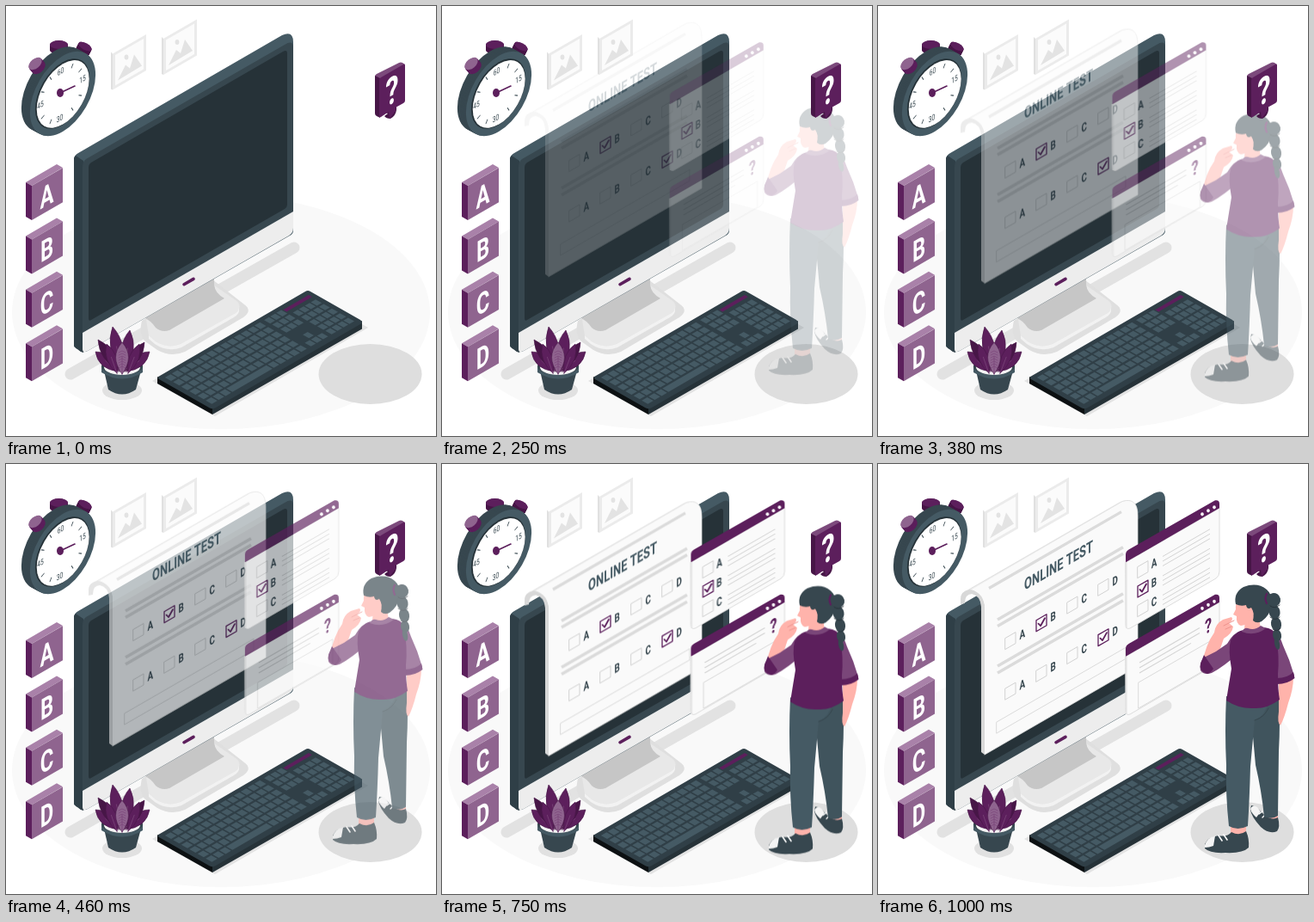
Animation of 500x500 px, one loop 1.04 s. Source, as an HTML page with a canvas:

```html
<!DOCTYPE html>
<html lang="en">
<head>
<meta charset="utf-8">
<title>Online test</title>
<style>
html, body { margin: 0; width: 100%; height: 100%; overflow: hidden; background: #fff; }
canvas { display: block; width: 500px; height: 500px; }
</style>
</head>
<body>
<canvas id="stage"></canvas>
<script>
const SIZE = 500, LOOP = 1040, STEPS = 25, SLIDE = 30;
const SLOPE = Math.tan(Math.PI / 6);
const C = {
  plum: '#5c1f5c', plumDark: '#471647', plumMid: '#7a4679', plumSoft: '#8f648f', plumPale: '#a981a9',
  ink: '#263238', slate: '#37474f', steel: '#455a64',
  skin: '#ffb3ab', line: '#dbdbdb', paper: '#fafafa'
};
const scale = Math.max(1, window.devicePixelRatio || 1);
let g;

function prepare(canvas) {
  canvas.width = canvas.height = SIZE * scale;
  const c = canvas.getContext('2d');
  c.scale(scale, scale);
  c.lineCap = c.lineJoin = 'round';
  return c;
}

function layer(draw) {
  const canvas = document.createElement('canvas');
  g = prepare(canvas);
  draw();
  return canvas;
}

function shape(d, fill, stroke, width = 1) {
  const p = new Path2D(d);
  if (fill) { g.fillStyle = fill; g.fill(p); }
  if (stroke) { g.strokeStyle = stroke; g.lineWidth = width; g.stroke(p); }
}

function poly(points, fill) {
  g.beginPath();
  points.forEach(([x, y]) => g.lineTo(x, y));
  g.closePath();
  g.fillStyle = fill;
  g.fill();
}

function oval(x, y, rx, ry, fill, turn = 0) {
  g.beginPath();
  g.ellipse(x, y, rx, ry, turn, 0, 7);
  g.fillStyle = fill;
  g.fill();
}

// Runs draw on a vertical plane that rises to the right.
function onWall(x, y, draw) {
  g.save();
  g.transform(0.866, -0.5, 0, 1, x, y);
  draw();
  g.restore();
}

// A straight bar that follows the wall.
function rule(x, y, x2, width, color = C.line) {
  g.beginPath();
  g.moveTo(x, y);
  g.lineTo(x2, y - (x2 - x) * SLOPE);
  g.strokeStyle = color;
  g.lineWidth = width;
  g.lineCap = 'butt';
  g.stroke();
  g.lineCap = 'round';
}

function panel(x, y, w, h) {
  const rise = w * SLOPE;
  return `M${x} ${y}L${x + w} ${y - rise}V${y - rise + h}L${x} ${y + h}Z`;
}

// Narrow lettering on the wall, centred on x, y.
function label(s, x, y, size, color, weight = 700) {
  g.save();
  g.transform(0.7, -0.7 * SLOPE, 0, 1, x, y);
  g.font = `${weight} ${size}px Roboto, "Liberation Sans", sans-serif`;
  g.textAlign = 'center';
  g.fillStyle = color;
  g.fillText(s, 0, size * 0.355);
  g.restore();
}

function checkbox(x, y, on) {
  shape(panel(x - 6, y - 3, 12, 13), null, on ? C.plum : '#d2d2d2', on ? 1.3 : 1);
  if (on) shape(`M${x - 3.5} ${y + 1}L${x - 1} ${y + 3.5}L${x + 4} ${y - 5.5}`, null, C.plum, 1.8);
}

function picture(x, y) {
  shape(`M${x - 2} ${y - 2}L${x} ${y}V${y + 42}L${x - 2} ${y + 41}Z`, '#e0e0e0');
  shape(panel(x, y, 39, 42), '#ebebeb');
  shape(panel(x + 3, y + 1.5, 33, 35.5), '#fbfbfb');
  shape(`M${x + 6} ${y + 31}L${x + 15} ${y + 13}L${x + 20} ${y + 17}L${x + 25} ${y + 1}L${x + 34} ${y + 14}Z`, '#e3e3e3');
  oval(x + 16, y + 4, 2.4, 3, '#e3e3e3');
}

function tile(letter, y) {
  poly([[23, y + 21], [59, y], [66, y + 4], [30, y + 25]], C.plumPale);
  poly([[23, y + 21], [30, y + 25], [30, y + 65], [23, y + 61]], C.plum);
  shape(panel(30, y + 25, 36, 40), C.plumSoft);
  label(letter, 47.5, y + 36, 34, '#fff', 700);
}

// A short cylinder whose cap lies dx, dy away from its base.
function knob(x, y, dx, dy, rx, ry, turn, side, cap) {
  const n = 12;
  for (let i = 0; i <= n; i++)
    oval(x + dx * i / n, y + dy * i / n, rx, ry, i < n ? side : cap, turn);
}

function stopwatch() {
  const disc = (x, y, r, fill) => onWall(x, y, () => oval(0, 0, r, r, fill));
  knob(89, 53, 3, -6, 8.5, 4, 0.5, C.plumDark, C.plum);
  shape('M57 52h9v9h-9Z', C.slate);
  knob(61.5, 51, 0, -6, 10.5, 5, 0, C.plumDark, C.plum);
  for (let i = 0; i <= 10; i++) disc(56 + i, 96.5 + i * 0.55, 44, i < 10 ? C.slate : C.steel);
  knob(38, 72, -4, -5, 9, 5.5, -0.7, C.plum, C.plumSoft);
  disc(65.5, 102, 36.5, C.ink);
  disc(66.2, 102.4, 35.2, '#fff');
  onWall(64.5, 102, () => {
    for (let i = 0; i < 12; i++) {
      if (i % 3 === 0) continue;
      const a = i * Math.PI / 6, c = Math.cos(a), s = Math.sin(a);
      g.beginPath();
      g.moveTo(c * 27, s * 27);
      g.lineTo(c * 31, s * 31);
      g.strokeStyle = C.slate;
      g.lineWidth = 1;
      g.stroke();
    }
  });
  label('60', 63.5, 76, 9.5, C.slate, 400);
  label('15', 89, 85, 9.5, C.slate, 400);
  label('30', 62.5, 130.5, 9.5, C.slate, 400);
  label('45', 40, 115, 9.5, C.slate, 400);
  shape('M63 101L80 93', null, C.plum, 1.6);
  oval(63, 101, 4, 5, C.plum);
}

function monitor() {
  shape('M75 428L335 281', null, '#e2e2e2', 13);
  // stand
  shape('M158 366L240 318L277 347Q287 354 276 362L208 402Q192 409 176 400L162 390Q154 382 158 366Z', '#dfdfdf');
  shape('M163 365L238 322L267 342Q276 349 267 357L203 393Q188 399 174 390L166 383Z', '#e8e8e8');
  shape('M166 383L174 390Q188 399 203 393L267 357Q271 354 271 349V355Q270 359 265 362L204 397Q188 403 173 393L166 387Z', '#f2f2f2');
  shape('M160 362L242 314V324Q243 334 254 340L190 377Q181 380 174 374Q169 366 160 362Z', '#c6c6c6');
  // case
  shape('M79 178Q79 174 84 171L321 34Q334 28 334 42V261Q334 265 330 267L95 401Q89 404 85 400L79 396Z', C.steel);
  shape('M79 177Q80 175 81 174L90 180V403Q86 402 83 399Q79 397 79 393Z', '#2f3f47');
  shape('M89 187Q89 181 93 178L324 45Q334 39 334 48V239L89 380Z', C.slate);
  shape('M96 188Q96 184 99 182L322 53Q327 50 327 55V231Q327 234 324 236L99 365Q96 367 96 363Z', C.ink);
  shape('M89 380L334 239V258Q334 264 329 267L95 401Q89 404 89 399Z', '#ededed');
  shape('M207 323.7L218 317.4', null, C.plum, 3.6);
}

function keyboard() {
  const at = (u, v) => [176 + 174 * u + 64 * v, 432 - 101 * u + 36 * v];
  const key = (u, v, w, h, fill = '#455a64') =>
    poly([at(u, v), at(u + w, v), at(u + w, v + h), at(u, v + h)], fill);
  shape('M170 436L351 333L421 374L243 477Z', '#e3e3e3');
  poly([[176, 431], [240, 467], [240, 475], [176, 439]], '#0d1113');
  poly([[240, 467], [414, 366], [414, 375.5], [240, 475]], C.ink);
  shape('M178 430.5L348 332Q351 330 354 332L412 365Q416 368 412 370L243 467.5Q240 469 237 467.5L178 434Q175 432 178 430.5Z', '#303f47');
  for (let r = 0; r < 6; r++) {
    const v = 0.07 + r * 0.148, h = 0.112;
    for (let i = 0; i < 14; i++) {
      if (r === 5 && i > 2 && i < 9) continue;
      key(0.025 + i * 0.046, v, 0.037, h);
    }
    if (r === 5) key(0.163, v, 0.267, h);
    for (let i = 0; i < 3; i++)
      if (r < 3 || r === 5 || (r === 4 && i === 1)) key(0.687 + i * 0.041, v, 0.033, h);
    if (r) for (let i = 0; i < 4; i++) key(0.825 + i * 0.04, v, 0.032, h);
  }
  key(0.81, 0.085, 0.17, 0.06, C.plum);
}

function leaf(x, y, tx, ty, w, fill) {
  const mx = x + (tx - x) * 0.55, my = y + (ty - y) * 0.55;
  const len = Math.hypot(tx - x, ty - y), nx = (y - ty) / len * w, ny = (tx - x) / len * w;
  shape(`M${x} ${y}Q${mx + nx} ${my + ny} ${tx} ${ty}Q${mx - nx} ${my - ny} ${x} ${y}Z`, fill, C.plumDark, 0.6);
  shape(`M${x} ${y}L${mx} ${my}`, null, C.plumMid, 0.8);
}

function plant() {
  oval(135, 447, 23, 11, '#e1e1e1');
  shape('M114 424L119 446Q135 457 151 446L157 424Z', C.slate);
  shape('M111 418V426Q135 441 159 426V418Z', C.steel);
  oval(135, 419, 24, 10, C.slate);
  oval(135, 420, 21, 9, '#f5f5f5');
  leaf(130, 425, 104, 402, 13, C.plum);
  leaf(140, 425, 167, 402, 13, C.plum);
  leaf(132, 425, 107, 388, 12, C.plumDark);
  leaf(138, 425, 161, 391, 12, C.plumDark);
  leaf(134, 424, 124, 373, 14, C.plum);
  leaf(138, 424, 144, 377, 14, C.plum);
  leaf(129, 427, 117, 393, 11, C.plum);
  leaf(142, 427, 155, 393, 11, C.plum);
  leaf(135, 428, 135, 391, 15, C.plumSoft);
  for (let y = 401; y < 421; y += 3) shape(`M131 ${y + 2}L135 ${y}L139 ${y + 2}`, null, C.plumMid, 0.7);
}

function scene() {
  g.fillStyle = '#fff';
  g.fillRect(0, 0, SIZE, SIZE);
  oval(250, 356, 243, 136, '#f9f9f9');
  picture(124, 55.5);
  picture(183, 38);
  stopwatch();
  [...'ABCD'].forEach((s, i) => tile(s, 184 + i * 62.4));
  monitor();
  keyboard();
  plant();
  oval(423.5, 428, 60, 35, '#dedede');
}

function paper() {
  // rolled-over top edge and its open end
  shape('M96 163V157Q96 150 103 147L281 44Q302 36 302 62L124 166Q122 154 112 151Q101 150 101 161Z', '#efefef');
  shape('M96 163V157Q96 148 106 146Q122 147 124 165V338L120 335V166Q119 153 109 151Q101 151 101 162Z', '#d8d8d8');
  shape('M124 338V166Q123 151 109 146L284 44Q302 38 302 60V235Z', C.paper);
  shape('M106 146L284 43.5Q302 38 302 60V235L124 338', null, '#dedede', 0.8);

  rule(129, 144.5, 283, 3.2);
  label('ONLINE TEST', 210, 117.5, 18.5, C.steel);
  for (const y of [181, 188.5, 235, 243]) rule(139, y, 285, 3.4);
  for (let row = 0; row < 2; row++)
    for (let i = 0; i < 4; i++) {
      const x = 154 + i * 36, y = 205.5 + row * 58.5 - i * 36 * SLOPE;
      checkbox(x, y, i === (row ? 3 : 1));
      label('ABCD'[i], x + 13.7, y - 7.8, 14, C.slate);
    }
  shape(panel(138, 300, 150, 13), null, C.line, 1);
}

function frame(y, bottom) {
  const b = bottom;
  shape(`M288 ${y + 12}L397 ${y - 51}V${b - 67}Q397 ${b - 62} 393 ${b - 59}L293 ${b - 1}Q288 ${b + 1} 288 ${b - 5}Z`,
    C.paper, '#dadada', 0.9);
  shape(`M288.7 ${y + 12}V${b - 2}`, null, '#e4e4e4', 1.8);
  shape(`M288 ${y + 12}V${y + 3}Q288 ${y - 1} 292 ${y - 3}L392 ${y - 60}Q397 ${y - 61} 397 ${y - 56}V${y - 51}Z`, C.plum);
  for (let i = 0; i < 3; i++) oval(377 + i * 7, y - 44 - i * 4, 1.8, 2.1, '#fff');
}

function windows() {
  frame(102.3, 192);
  for (let i = 0; i < 3; i++) {
    const y = 123.5 + i * 22.5;
    checkbox(308, y - 1, i === 1);
    label('ABC'[i], 321, y - 8.5, 14, C.slate);
    for (let k = 0; k < 3; k++) rule(331, y - 16 + k * 5.5, 386, 1, '#d4d4d4');
  }
  frame(211.8, 292);
  for (let k = 0; k < 3; k++) rule(304, 231 + k * 6, k < 2 ? 374 : 364, 1.1, '#d4d4d4');
  shape(panel(303, 254, 87, 30), null, C.line, 1);
  label('?', 384, 188, 23, C.plum);
}

function woman() {
  // far shoe, near shoe
  shape('M450 405L465 404V418H450Z', C.skin);
  shape('M434 397Q440 397 449 408Q458 415 465 411Q468 422 464 427Q455 431 445 422Q434 410 433 402Z', C.slate);
  shape('M433 401Q436 395 441 399L445 404L440 411Q434 406 433 401Z', '#f4f4f4');
  shape('M443 407L447 404M447 411L451 407', null, '#fff', 1.3);
  shape('M410 414H428V434H410Z', C.skin);
  shape('M380 442Q383 434 396 432Q406 434 411 428Q420 433 428 427Q432 436 431 446Q424 453 404 452Q386 453 380 447Z', C.slate);
  shape('M380 443Q383 434 392 432.5L390 444Q385 446 380 446Z', '#f4f4f4');
  shape('M396 432L400 438M402 431L406 437', null, '#fff', 1.6);
  // trousers
  shape('M434 274L466 270Q468 300 466 334L465 409Q458 414 449 410Q446 380 439 350L435 306Z', '#40545d');
  shape('M405 270L454 276Q451 292 438 298Q435 330 433 352Q432 390 430 421Q418 427 408 421Q404 385 405 350Q403 310 405 270Z', C.steel);
  shape('M438 298Q449 295 454 284', null, C.slate, 1);
  // right arm
  shape('M466 250L483 248Q483 262 477 278Q473 294 468 304Q464 302 466 288Z', C.skin);
  shape('M456 193Q467 197 471 211Q479 228 484 246Q477 254 464 254Q464 236 457 222Z', C.plumMid);
  shape('M464 249Q476 249 483 242L484.5 249Q476 256 464 256Z', C.plum);
  // left forearm and hand
  shape('M377 232Q381 210 391 196Q392 186 401 181L411 178Q414 181 408 185L413 189Q412 197 402 203Q397 218 390 236Z', C.skin);
  shape('M414 182L402 188M411 189L404 192', null, '#ee938e', 1);
  shape('M424 193Q413 196 406 209L393 218L379 225Q373 232 375 240Q379 246 388 243Q403 235 419 220Z', C.plumMid);
  shape('M379 222L390 238Q387 243 383 244Q373 241 375 232Z', C.plum);
  // neck, vest
  shape('M427 178L443 176L445 193Q435 199 426 192Z', C.skin);
  shape('M422 194Q437 199 449 190Q460 191 463 199Q467 224 465 244Q465 263 467 274Q452 285 437 284Q420 285 405 275Q408 256 411 238Q407 216 410 205Q414 197 422 194Z', C.plum);
  shape('M423 195Q426 190 430 191Q438 194 445 188L451 191Q438 201 423 195Z', C.plumMid);
  // face and hair
  shape('M419 156Q415 164 416 169L413 175L417 177Q416 186 422 188Q430 187 433 181L444 179L442 160L430 153Z', C.skin);
  shape('M416 163Q413 150 425 143Q441 137 452 146Q459 152 458 163Q456 176 446 183Q440 186 436 182Q438 173 434 167Q429 170 428 164Q422 166 416 163Z', C.slate);
  oval(433.5, 174, 2.8, 4.2, C.skin);
  [[460, 158, 8, 8], [461, 172, 6.5, 8], [463, 186, 6, 8], [464, 199, 5, 7], [464, 209, 3, 7]]
    .forEach(([x, y, rx, ry]) => oval(x, y, rx, ry, C.slate, -0.2));
  shape('M456 165Q461 169 467 164M456 178Q462 183 467 178M459 192Q464 196 468 191', null, C.ink, 0.9);
  shape('M452 151Q449 156 452 162', null, C.plum, 2.2);
}

function bubble() {
  shape('M441 124L454 116V121Q453 128 447 131Q442 131 440 128L444 125Z', C.plumDark);
  shape('M429 82Q429 80 431 79L457 66Q459 65 461 66L464 68L434 85Z', '#7c4a7c');
  shape('M429 81L435 84V130L431 128Q429 127 429 125Z', C.plumDark);
  shape('M434 86Q434 84 436 83L462 68Q464 67 464 69V110Q464 112 462 113L453 118V122L446 131L445 123L436 129Q434 130 434 128Z', C.plum);
  label('?', 449, 98, 44, '#fff');
}

// Cubic Bézier easing with a soft overshoot.
function ease(x) {
  if (x <= 0) return 0;
  if (x >= 1) return 1;
  const curve = (s, a, b) => 3 * (1 - s) * (1 - s) * s * a + 3 * (1 - s) * s * s * b + s * s * s;
  let lo = 0, hi = 1;
  for (let i = 0; i < 24; i++) {
    const mid = (lo + hi) / 2;
    if (curve(mid, 0.36, 0.5) < x) lo = mid; else hi = mid;
  }
  return curve(lo, -0.01, 1.38);
}

const stage = prepare(document.getElementById('stage'));
const layers = [scene, paper, windows, woman, bubble].map(layer);
const [back, sheet, panes, person, talk] = layers;

function put(img, dx = 0, dy = 0, alpha = 1) {
  stage.globalAlpha = Math.max(0, Math.min(1, alpha));
  stage.drawImage(img, dx, dy, SIZE, SIZE);
}

const start = performance.now();
function tick() {
  const t = (performance.now() - start) % LOOP;
  const step = Math.floor((t + 4) * STEPS / LOOP) % STEPS;
  const k = step < 2 ? 0 : ease(step / (STEPS - 1));
  const shift = (k - 1) * SLIDE;
  put(back);
  put(sheet, 0, shift, k);
  put(panes, shift, 0, k);
  put(person, 0, shift, k);
  put(talk);
  requestAnimationFrame(tick);
}
tick();
</script>
</body>
</html>
```
